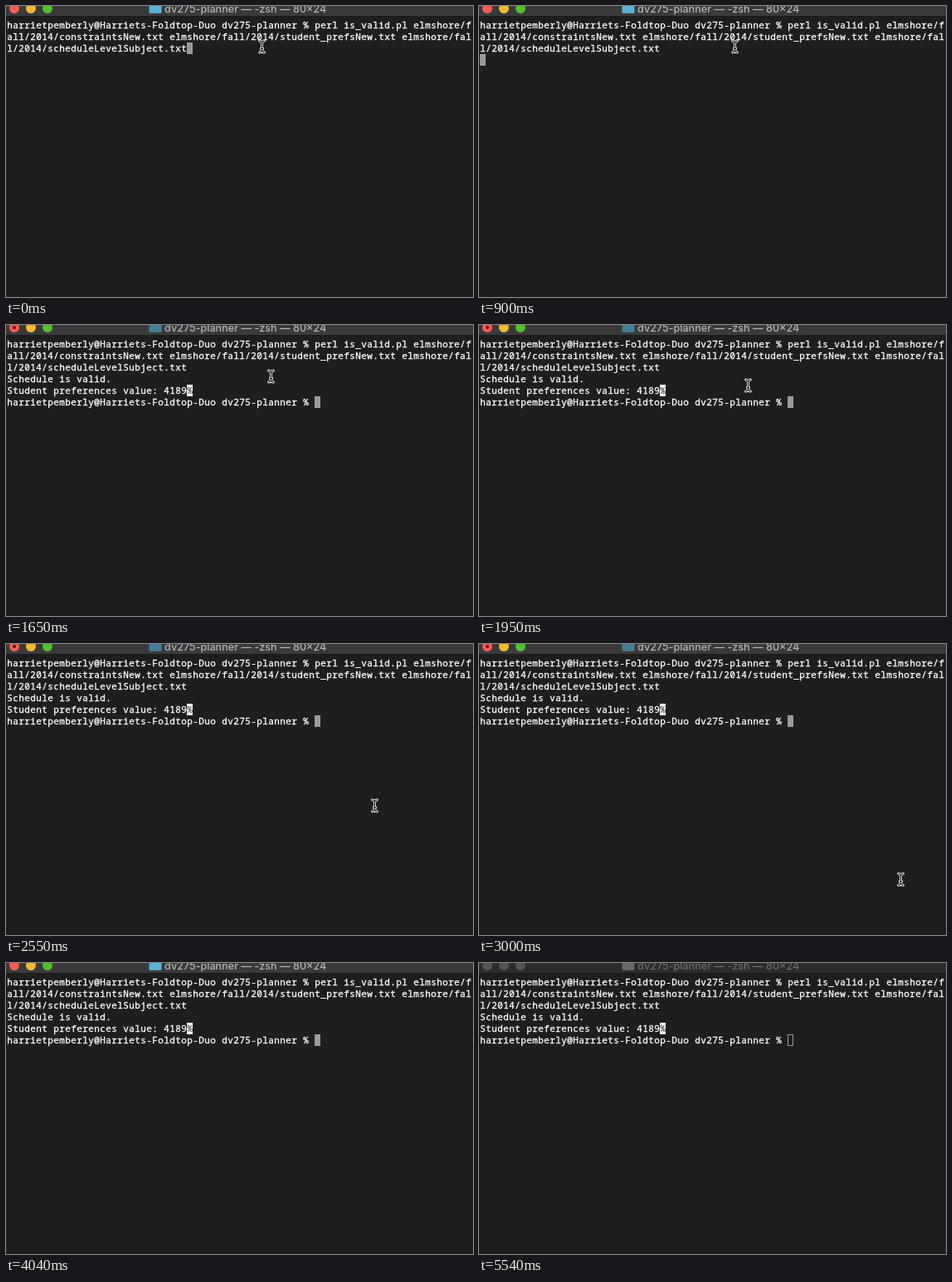
Recreate the animation shown at these times as an HTML page. Size 563 by 351 pixels, loop 5640 ms.

```html
<!DOCTYPE html>
<html lang="en">
<head>
<meta charset="utf-8">
<title>Terminal</title>
<style>
  html, body { margin: 0; width: 100%; height: 100%; overflow: hidden; background: #1e1e1e; }
  svg { display: block; width: 563px; height: 351px; }

  .mono {
    font: 400 11px "Noto Sans Mono", "DejaVu Sans Mono", monospace;
    letter-spacing: .4px;
    fill: #fff;
    stroke: #fff;
    stroke-width: .3px;
  }
  .inverse { fill: #1e1e1e; stroke: none; }
  .title { font: 500 12.6px Inter, "Liberation Sans", sans-serif; }
  .cursor { fill: #9b9b9b; }
  .hollow { fill: none; stroke: #9b9b9b; }

  .bar, .title, .red, .yellow, .green, .edited, .folder,
  .typing, .running, .output, .prompt, .hollow, .pointer {
    animation: 5640ms step-end infinite;
  }

  /* Window chrome: active, then inactive at the end */
  .bar { animation-name: bar; }
  .title { animation-name: title; }
  .red { animation-name: red; }
  .yellow { animation-name: yellow; }
  .green { animation-name: green; }
  .folder { animation-name: folder; }
  .edited { animation-name: edited; }
  @keyframes bar { 0% { fill: #3a3a3a } 98.226%, 100% { fill: #2b2c2c } }
  @keyframes title { 0% { fill: #b6b6b6 } 98.226%, 100% { fill: #6c6c6c } }
  @keyframes red { 0% { fill: #fc5b52 } 98.226%, 100% { fill: #545454 } }
  @keyframes yellow { 0% { fill: #f0bb30 } 98.226%, 100% { fill: #545454 } }
  @keyframes green { 0% { fill: #50c22b } 98.226%, 100% { fill: #545454 } }
  @keyframes folder {
    0% { fill: #59b3d8 }
    18.617% { fill: #437d97 }
    71.631% { fill: #59b3d8 }
    98.226%, 100% { fill: #686868 }
  }
  @keyframes edited {
    0% { visibility: hidden }
    18.617% { visibility: visible }
    71.631%, 100% { visibility: hidden }
  }

  /* Terminal contents */
  .typing { animation-name: typing; }
  .running { animation-name: running; }
  .output { animation-name: output; }
  .prompt { animation-name: prompt; }
  .hollow { animation-name: hollow; }
  @keyframes typing { 0% { visibility: visible } 15.957%, 100% { visibility: hidden } }
  @keyframes running {
    0% { visibility: hidden }
    15.957% { visibility: visible }
    18.617%, 100% { visibility: hidden }
  }
  @keyframes output { 0% { visibility: hidden } 18.617%, 100% { visibility: visible } }
  @keyframes prompt {
    0% { visibility: hidden }
    18.617% { visibility: visible }
    98.226%, 100% { visibility: hidden }
  }
  @keyframes hollow { 0% { visibility: hidden } 98.226%, 100% { visibility: visible } }

  /* Mouse pointer */
  .pointer { animation-name: pointer; fill: none; stroke-linecap: round; stroke-linejoin: round; }
  .edge { stroke: #fff; stroke-width: 2.8; }
  .core { stroke: #111; stroke-width: 1.1; }
  @keyframes pointer {
    0% { transform: translate(304px, 40px) }
    29.255% { transform: translate(315px, 53px) }
    31.914% { transform: translate(316px, 55px) }
    34.574% { transform: translate(320px, 64px) }
    37.234% { transform: translate(344px, 86px) }
    39.893% { transform: translate(375px, 113px) }
    45.212% { transform: translate(440px, 186px) }
    47.872% { transform: translate(448px, 195px) }
    50.531% { transform: translate(461px, 221px) }
    53.191% { transform: translate(504px, 275px) }
    58.510% { transform: translate(523px, 312px); visibility: visible }
    60.992%, 100% { transform: translate(523px, 312px); visibility: hidden }
  }
</style>
</head>
<body>
<svg viewBox="0 0 563 351">
  <defs>
    <path id="beam" d="M1.6 2Q4.3 2.2 4.5 5Q4.7 2.2 7.4 2M4.5 5V13M1.6 16Q4.3 15.8 4.5 13Q4.7 15.8 7.4 16M3.3 11.5H5.7"/>
  </defs>

  <rect width="563" height="351" fill="#1e1e1e"/>

  <rect class="bar" width="563" height="12"/>
  <rect y="12" width="563" height="1" fill="#191919"/>
  <circle class="red" cx="10" cy="3" r="6"/>
  <circle class="edited" cx="10" cy="3" r="2" fill="#5c0805"/>
  <circle class="yellow" cx="30" cy="3" r="6"/>
  <circle class="green" cx="50" cy="3" r="6"/>
  <rect class="folder" x="172.5" y="-3" width="15" height="11.7" rx="1.5"/>
  <text class="title" x="280" y="8" text-anchor="end">dv275-planner</text>
  <text class="title" x="283.5" y="8">— -zsh — 80×24</text>

  <g class="mono">
    <text x="1.2" y="27">harrietpemberly@Harriets-Foldtop-Duo dv275-planner % perl is_valid.pl elmshore/f</text>
    <text x="1.2" y="41">all/2014/constraintsNew.txt elmshore/fall/2014/student_prefsNew.txt elmshore/fal</text>
    <text x="1.2" y="55">l/2014/scheduleLevelSubject.txt</text>
    <g class="output">
      <text x="1.2" y="69">Schedule is valid.</text>
      <text x="1.2" y="83">Student preferences value: 4189</text>
      <rect x="218" y="72" width="7" height="14" stroke="none"/>
      <text class="inverse" x="218.2" y="83">%</text>
      <text x="1.2" y="97">harrietpemberly@Harriets-Foldtop-Duo dv275-planner %</text>
    </g>
  </g>

  <rect class="cursor typing" x="218" y="44" width="7" height="14"/>
  <rect class="cursor running" x="1" y="58" width="7" height="14"/>
  <rect class="cursor prompt" x="372" y="86" width="7" height="14"/>
  <rect class="hollow" x="372.5" y="86.5" width="6" height="13"/>

  <g class="pointer">
    <use href="#beam" class="edge"/>
    <use href="#beam" class="core"/>
  </g>
</svg>
</body>
</html>
```
